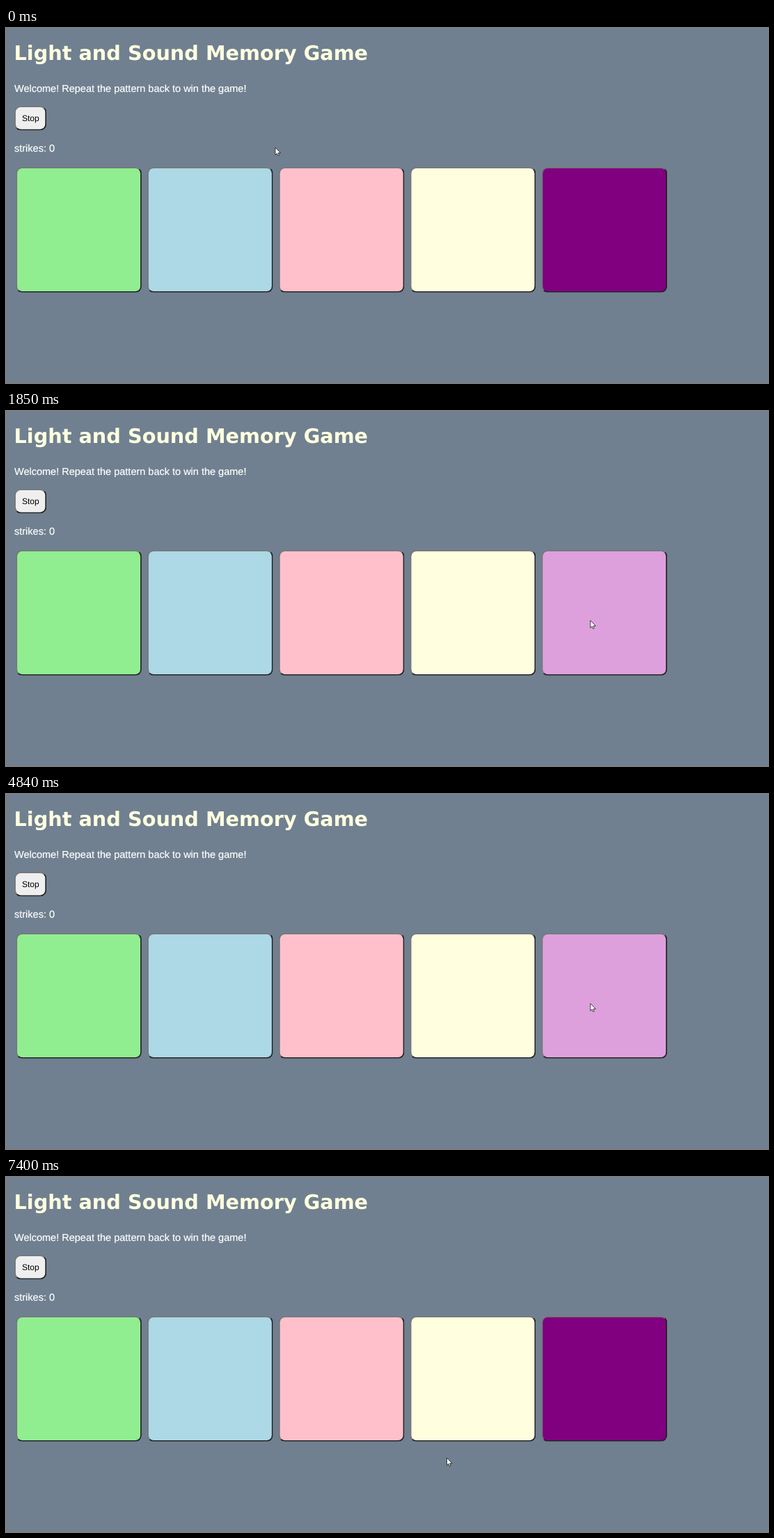
An HTML page that plays this animation: 1095x511 px, repeating every 8 s.

```html
<!DOCTYPE html>
<html lang="en">
<head>
<meta charset="utf-8">
<title>Light and Sound Memory Game</title>
<style>
  html, body { margin: 0; width: 100%; height: 100%; overflow: hidden; background: #708090; }
  #stage { position: absolute; left: 0; top: 0; width: 1095px; height: 511px; overflow: hidden; background: #708090; }
  .edge { position: absolute; left: 0; bottom: 0; background: #787c82; }
  .key {
    position: absolute; left: 0; top: 0; box-sizing: border-box;
    border: 2px solid; border-color: #767676 #222 #222 #767676;
    border-radius: 10px; transform-origin: 0 0;
  }
  .key.pressed { border-color: #222 #767676 #767676 #222; }
  svg { position: absolute; left: 0; top: 0; }
  text {
    font-family: "Liberation Sans", Arial, sans-serif; font-size: 14.5px;
    fill: #fff; stroke: #fff; stroke-width: .2px; text-rendering: geometricPrecision;
  }
  .title { font: bold 28.75px "DejaVu Sans", Verdana, sans-serif; fill: #ffffe0; stroke: none; }
  .label { font-size: 12.1px; fill: #000; stroke: none; }
</style>
</head>
<body>
<div id="stage">
  <div class="edge" style="width:1px;height:511px"></div>
  <div class="edge" style="width:1095px;height:1px"></div>
</div>
<script>
const LOOP = 8000;
const ZOOM = 0.903;
const stage = document.getElementById('stage');

function addKey(x, y, width, height, color) {
  const key = document.createElement('div');
  key.className = 'key';
  key.style.cssText = `width:${width}px;height:${height}px;background:${color};` +
    `transform:translate(${x}px,${y}px) scale(${ZOOM})`;
  stage.append(key);
  return key;
}

addKey(12.1, 112.3, 51, 39, '#efefef');
const pads = ['lightgreen', 'lightblue', 'pink', 'lightyellow', 'plum']
  .map((color, i) => addKey(14.3 + 188.8 * i, 200.2, 200, 200, color));

stage.insertAdjacentHTML('beforeend', `
  <svg width="1095" height="511">
    <text class="title" x="11.5" y="46.4">Light and Sound Memory Game</text>
    <text x="12" y="92">Welcome! Repeat the pattern back to win the game!</text>
    <text class="label" x="22.9" y="134.2">Stop</text>
    <text x="12" y="178.2">strikes: 0</text>
    <path id="cursor" d="M0 0V16.5L3.7 13L6 18.3L8.6 17.2L6.3 12H11.5Z"
      fill="#fff" stroke="#000" stroke-width="1.1"/>
  </svg>`);
const cursor = document.getElementById('cursor');

const smooth = p => p < .5 ? (2 * p) ** 2.3 / 2 : 1 - (2 - 2 * p) ** 2.3 / 2;
const speedUp = p => p ** 1.7;
const slowDown = p => 1 - (1 - p) ** 3;

// Each glide moves the pointer in evenly timed jumps, the first at `from`, the last at `to`.
const START = { x: 387, y: 172 };
const glides = [
  { from: 150, to: 150, steps: 1, x: 411.8, y: 172, ease: smooth },
  { from: 300, to: 660, steps: 4, x: 829, y: 280, ease: smooth },
  { from: 810, to: 930, steps: 2, x: 840.4, y: 286.4, ease: slowDown },
  { from: 1300, to: 1450, steps: 2, x: 839.8, y: 301.5, ease: speedUp },
  { from: 5730, to: 5970, steps: 3, x: 349.4, y: 287.3, ease: smooth, sag: 42 },
  { from: 6120, to: 6120, steps: 1, x: 312.4, y: 282.3, ease: smooth },
  { from: 6510, to: 6660, steps: 2, x: 591.4, y: 376.3, ease: speedUp },
  { from: 6810, to: 6950, steps: 2, x: 633.5, y: 404.3, ease: slowDown }
];

function pointerAt(time) {
  let { x, y } = START;
  for (const g of glides) {
    if (time < g.from) break;
    const interval = (g.to - g.from) / (g.steps - 1 || 1) || 1;
    const step = Math.min(g.steps, 1 + Math.floor((time - g.from) / interval));
    const p = step / g.steps;
    x += (g.x - x) * g.ease(p);
    y += (g.y - y) * g.ease(p) + (g.sag || 0) * Math.sin(Math.PI * p);
  }
  return { x, y };
}

// Lit intervals; `press` marks a mouse click rather than playback.
const BLUE = 1, PURPLE = 4;
const flashes = [
  { pad: PURPLE, from: 0, to: 810 },
  { pad: PURPLE, from: 1730, to: 1850, press: true },
  { pad: PURPLE, from: 2980, to: 3720 },
  { pad: BLUE, from: 4000, to: 4840 },
  { pad: BLUE, from: 6240, to: 6360, press: true },
  { pad: PURPLE, from: 7400, to: LOOP }
];
const colors = { [BLUE]: ['lightblue', 'blue'], [PURPLE]: ['plum', 'purple'] };

function draw(time) {
  const { x, y } = pointerAt(time);
  cursor.setAttribute('transform', `translate(${x} ${y}) scale(.65)`);
  for (const pad of [BLUE, PURPLE]) {
    const flash = flashes.find(f => f.pad === pad && time >= f.from && time < f.to);
    pads[pad].style.backgroundColor = colors[pad][flash ? 1 : 0];
    pads[pad].classList.toggle('pressed', Boolean(flash?.press));
  }
}

const begin = performance.now();
function tick() {
  draw((performance.now() - begin) % LOOP);
  requestAnimationFrame(tick);
}
draw(0);
requestAnimationFrame(tick);
</script>
</body>
</html>
```
